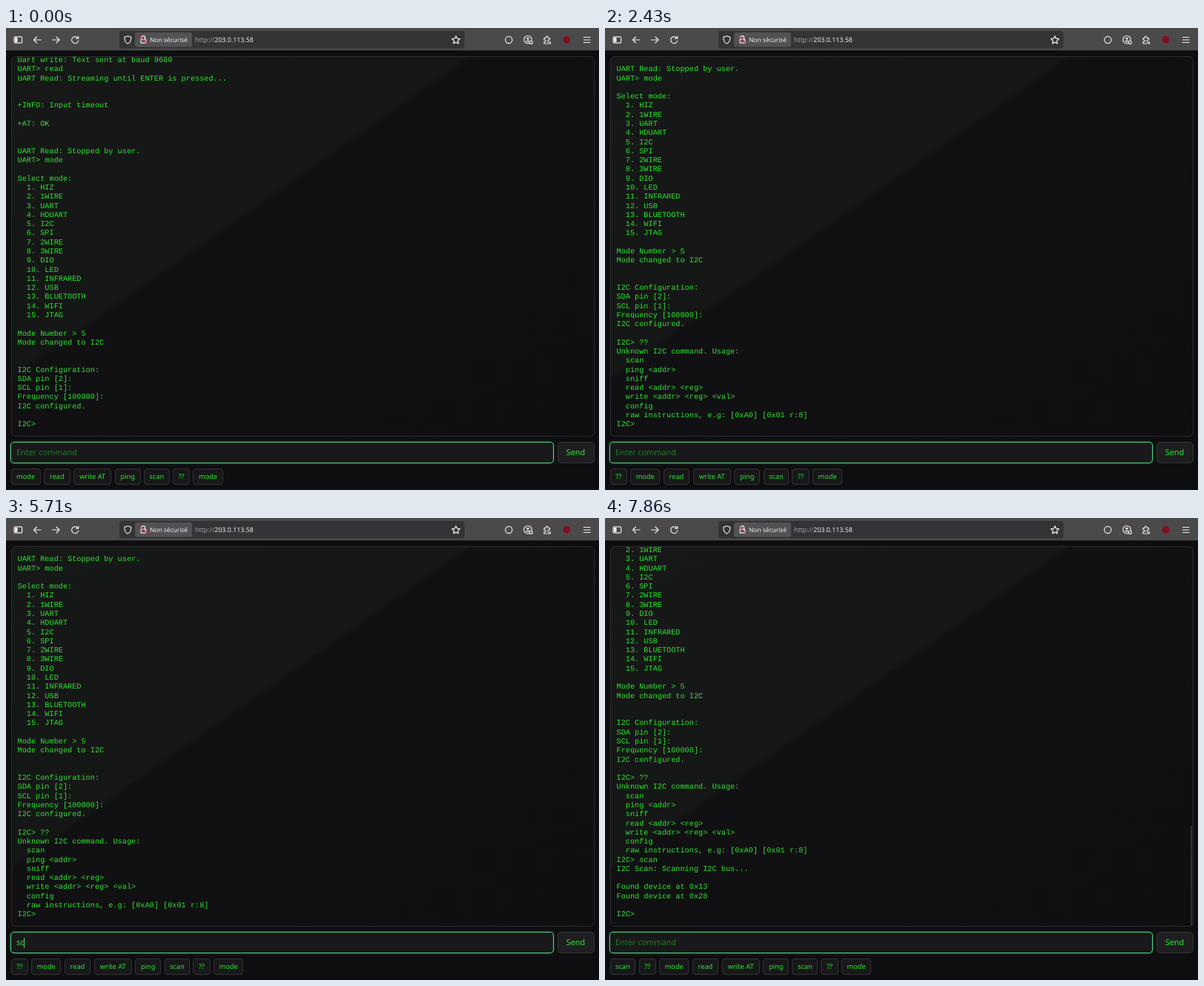
Recreate the animation shown at these times as an HTML page. Size 800 by 623 pixels, loop 8 s.

```html
<!DOCTYPE html>
<html lang="fr">
<head>
<meta charset="utf-8">
<title>Serial console</title>
<style>
  * { box-sizing: border-box; }
  html, body { margin: 0; width: 100%; height: 100%; overflow: hidden; background: #0e0e11; }
  body { text-rendering: geometricPrecision; }
  #stage { position: relative; width: 800px; height: 623px; overflow: hidden; color: #2ce52f; font-family: "Noto Sans", sans-serif; }
  #stage > * { position: absolute; }
  #toolbar { left: 0; top: 0; }
  #terminal {
    left: 6.5px; top: 37.5px; width: 787px; height: 513.5px; overflow: hidden;
    border: 1px solid #2d2d2f; border-radius: 6px;
    background: linear-gradient(145deg, #171818, #151716 40.4%, #111113 41%, #0f0f12);
  }
  #log {
    position: absolute; left: 8px; bottom: 8.4px; margin: 0;
    font: 10.24px/12.288px "Liberation Mono", monospace;
  }
  #thumb { left: 790px; width: 2px; background: #747476; border-radius: 1px; }
  #field, #send { display: flex; align-items: center; border-radius: 5px; font-size: 10.9px; white-space: pre; }
  #field {
    left: 6px; top: 558px; width: 733px; height: 29px; padding-left: 7px;
    border: 1.3px solid #55cf80; background: #19191b; box-shadow: 0 0 3px #1f7a45;
  }
  #caret { width: 1px; height: 14px; margin-right: -1px; background: #37e83a; }
  #hint { color: #1c7d20; }
  #send {
    left: 743.5px; top: 558px; width: 50px; height: 29px; justify-content: center;
    border: 1px solid #343436; background: #1f1f21;
  }
  #chips { left: 6.6px; top: 593.5px; display: flex; gap: 4.4px; font-size: 9.25px; }
  #chips span {
    display: flex; align-items: center; justify-content: center; height: 22px; white-space: pre;
    border: 1px solid #333335; border-radius: 4px; background: #18181a;
  }
</style>
</head>
<body>
<div id="stage">
  <svg id="toolbar" width="800" height="31" fill="none" stroke="#ececec" stroke-width="1.2" stroke-linecap="round" stroke-linejoin="round">
    <path d="M0 0H800V30H0Z" fill="#4b4a4b" stroke="none"/>
    <path d="M0 30.5H800" stroke="#1b1b1d"/>
    <rect x="153" y="4" width="465.5" height="23.5" rx="3" fill="#343335" stroke="none"/>
    <rect x="174" y="6" width="77" height="19.5" rx="2.5" fill="#525153" stroke="none"/>
    <rect x="11" y="11.8" width="10.6" height="8.4" rx="1.5"/>
    <path d="M12 13H15.5V19H12Z" fill="#ececec" stroke="none"/>
    <path d="M47 16H37.5M41.5 12L37.5 16L41.5 20M62.500 16H72M68 12L72 16L68 20"/>
    <path d="M96.800 13.300A4.600 4.600 0 1 0 97.700 17M97.700 11V14.200H94.500"/>
    <path d="M164.300 10.800L168.800 12.400C169 17 167.500 19.700 164.300 21.200C161.100 19.700 159.600 17 159.800 12.400Z"/>
    <path d="M183 15V13A2.300 2.300 0 0 1 187.600 13V15"/>
    <rect x="182" y="15.200" width="6.800" height="5" rx="1"/>
    <path d="M181.300 11.500L190 20.700" stroke="#e0455a" stroke-width="1.400"/>
    <path d="M607 10.800L608.600 14.200L612.300 14.700L609.600 17.200L610.300 20.900L607 19.100L603.700 20.900L604.400 17.200L601.700 14.700L605.400 14.200Z"/>
    <circle cx="678.300" cy="16" r="4.600"/>
    <circle cx="704" cy="15.700" r="5.200"/>
    <circle cx="704" cy="14.200" r="1.600" fill="#ececec" stroke="none"/>
    <path d="M701 18.600C701.500 16 706.500 16 707 18.600Z" fill="#ececec" stroke="none"/>
    <circle cx="708.300" cy="19.500" r="2" fill="#4b4a4b"/>
    <path d="M726 13.500H728.300V12.500A1.500 1.500 0 0 1 731.300 12.500V13.500H733.500V16H732.500A1.500 1.500 0 0 0 732.500 19H734.500V21H726V18.500H727A1.200 1.200 0 0 0 727 16H726Z"/>
    <circle cx="756.500" cy="15.800" r="4.900" fill="#850d20" stroke="none"/>
    <path d="M779.500 12.500H788M779.500 16H788M779.500 19.500H788"/>
    <g fill="#efefef" stroke="none" font-family="Noto Sans, sans-serif">
      <text x="194" y="19" font-size="8.400">Non sécurisé</text>
      <text x="255" y="19" font-size="8.850"><tspan fill="#a5a4a6">http://</tspan>203.0.113.58</text>
    </g>
  </svg>
  <div id="terminal"><pre id="log"></pre></div>
  <div id="thumb"></div>
  <div id="field"><span id="typed"></span><i id="caret"></i><span id="hint">Enter command</span></div>
  <div id="send">Send</div>
  <div id="chips"></div>
</div>
<script>
const LOOP = 8000, FPS = 7, BLINK = 500;
const $ = id => document.getElementById(id);

const modes = "HIZ 1WIRE UART HDUART I2C SPI 2WIRE 3WIRE DIO LED INFRARED USB BLUETOOTH WIFI JTAG"
  .split(" ").map((name, i) => `  ${i + 1}. ${name}`).join("\n");

const session = `Uart write: Text sent at baud 9600
UART> read
UART Read: Streaming until ENTER is pressed...


+INFO: Input timeout

+AT: OK


UART Read: Stopped by user.
UART> mode

Select mode:
${modes}

Mode Number > 5
Mode changed to I2C


I2C Configuration:
SDA pin [2]:
SCL pin [1]:
Frequency [100000]:
I2C configured.

I2C> `;

const help = `??
Unknown I2C command. Usage:
  scan
  ping <addr>
  sniff
  read <addr> <reg>
  write <addr> <reg> <val>
  config
  raw instructions, e.g: [0xA0] [0x01 r:8]
I2C> `;

const scan = `scan
I2C Scan: Scanning I2C bus...

Found device at 0x13
Found device at 0x28

I2C> `;

// keys: first keystroke; enter: submit; reply: output appears; hidden: scrollbar gone
const commands = [
  { text: "??", keys: 280, enter: 710, reply: 995, hidden: 2200, output: help, thumbTop: 408 },
  { text: "scan", keys: 5565, enter: 6280, reply: 6425, hidden: 8030, output: scan, thumbTop: 415 }
];
const chipWidth = { mode: 40.2, read: 35.4, "write AT": 51.4, ping: 34.8, scan: 34.6, "??": 23.2 };
const history = ["mode", "read", "write AT", "ping", "scan", "??", "mode"];
const clamp = x => Math.max(0, Math.min(1, x));

function showChips(names) {
  const key = names.join();
  if ($("chips").dataset.key === key) return;
  $("chips").dataset.key = key;
  $("chips").replaceChildren(...names.map(name => {
    const chip = document.createElement("span");
    chip.textContent = name;
    chip.style.width = chipWidth[name] + "px";
    return chip;
  }));
}

function render(t) {
  let log = session, typed = "", caret = false, thumb = 0, top = 408;
  let chips = history;
  for (const c of commands) {
    if (t >= c.keys && t < c.enter) {
      typed = c.text.slice(0, 1 + Math.floor((t - c.keys) * FPS / 1000));
      caret = true;
    }
    if (t >= c.enter) {
      chips = [c.text, ...chips];
      caret = (t - c.enter) % (2 * BLINK) < BLINK;
    }
    if (t >= c.reply) {
      log += c.output;
      top = c.thumbTop;
      thumb = Math.min(clamp((t - c.reply) / 290), clamp((c.hidden - t) / 500));
    }
  }
  if ($("log").textContent !== log) $("log").textContent = log;
  $("typed").textContent = typed;
  $("hint").style.display = typed ? "none" : "";
  $("caret").style.opacity = caret ? 1 : 0;
  $("thumb").style.cssText = `top:${top}px;height:${549 - top}px;opacity:${thumb}`;
  showChips(chips);
}

const start = performance.now();
function tick() {
  const t = (performance.now() - start) % LOOP;
  render(Math.floor((t + 5) * FPS / 1000) * 1000 / FPS);
  requestAnimationFrame(tick);
}
tick();
</script>
</body>
</html>
```
